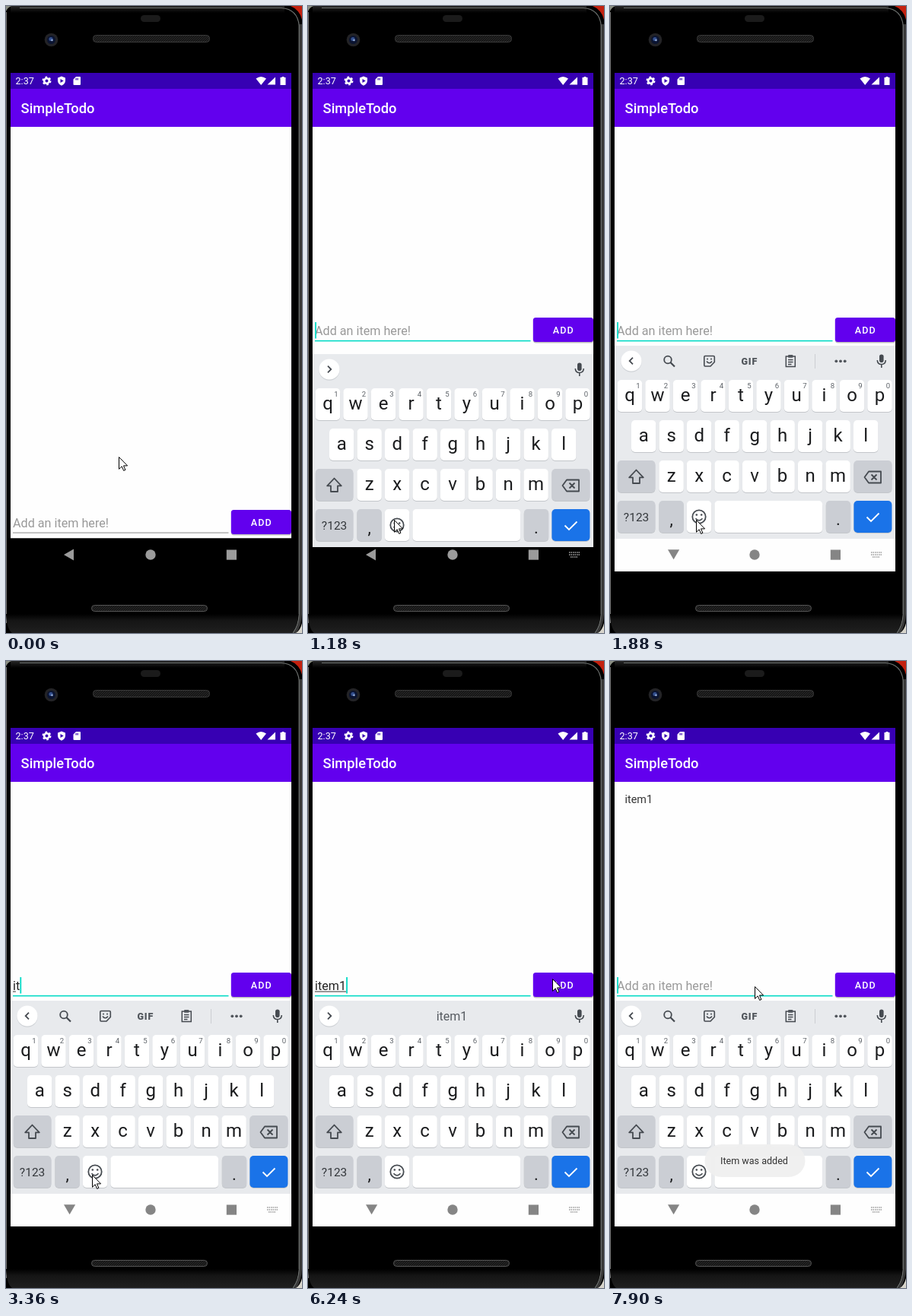
Animation of 389 by 825 pixels, one loop 8000 ms. Source, as an HTML page:

```html
<!DOCTYPE html>
<html lang="en">
<head>
<meta charset="utf-8">
<title>Todo app</title>
<style>
  html, body { margin: 0; width: 100%; height: 100%; overflow: hidden; background: #000; }
  svg { display: block; width: 389px; height: 825px; font-family: Roboto, sans-serif; }
  .mid { text-anchor: middle; }
  .line { fill: none; stroke: #454a50; }
  .field { font-size: 16.16px; }
</style>
</head>
<body>
<svg viewBox="0 0 389 825">
  <defs>
    <linearGradient id="top" x2="0" y2="1"><stop stop-color="#262626"/><stop offset="1" stop-color="#000"/></linearGradient>
    <linearGradient id="base" x2="0" y2="1"><stop stop-color="#000"/><stop offset=".35" stop-color="#151515"/><stop offset="1" stop-color="#1f1f1f"/></linearGradient>
    <pattern id="mesh" width="3" height="3" patternUnits="userSpaceOnUse"><rect width="3" height="3" fill="#151515"/><path d="M0 3L3 0" stroke="#2c2c2c"/></pattern>
    <clipPath id="below"><rect x="6" y="159" width="369" height="585"/></clipPath>
    <clipPath id="btnClip"><rect x="296" y="663" width="79" height="32" rx="3.5"/></clipPath>
  </defs>

  <!-- phone body -->
  <rect width="389" height="825" fill="#000"/>
  <path d="M374 0H389V18Q386 5 374 0Z" fill="#c3210f"/>
  <rect x="6" width="360" height="9" fill="url(#top)"/>
  <path d="M386.800 24V800Q386 816 379 825" fill="none" stroke="#383838" stroke-width="4.400"/>
  <path d="M18 2.500H362Q383 4 385.300 26V800Q384.500 815 377 825" fill="none" stroke="#6d716f" stroke-width="1.200"/>
  <path d="M.5 8V812" stroke="#777"/>
  <path d="M0 800H384.500Q384 815 376 825H8Q1 820 0 800Z" fill="url(#base)"/>
  <path d="M389 812V825H381Q387 821 389 812Z" fill="#d8d5cc"/>
  <path d="M0 0H7Q2 2 0 7Z" fill="#8b8f84"/>
  <rect x="177" y="12" width="26" height="9" rx="4.500" fill="#1b1b1b"/>
  <rect x="114.500" y="38.500" width="153" height="9" rx="4" fill="url(#mesh)" stroke="#3a3a3a"/>
  <rect x="112.500" y="788.500" width="152" height="8" rx="4" fill="url(#mesh)" stroke="#555"/>
  <circle cx="59.500" cy="44.500" r="8.800" fill="#232326"/>
  <circle cx="59.500" cy="44.500" r="5.500" fill="#0b1430"/>
  <circle cx="59" cy="43.500" r="2.600" fill="#34508e"/>
  <circle cx="60.500" cy="45" r="1.200" fill="#9db4dc"/>

  <!-- app -->
  <rect x="6" y="88" width="369" height="612.500" fill="#fefefe"/>
  <rect x="6" y="88" width="369" height="21" fill="#3700b3"/>
  <rect x="6" y="109" width="369" height="50" fill="#6200ee"/>
  <g fill="#fff">
    <text x="12.500" y="103.300" font-size="12.600">2:37</text>
    <circle cx="53.500" cy="98.500" r="3.300" fill="none" stroke="#fff" stroke-width="2.600"/>
    <circle cx="53.500" cy="98.500" r="5" fill="none" stroke="#fff" stroke-width="2" stroke-dasharray="2.62"/>
    <path d="M73 92.500L78 94.500V98Q78 102.500 73 104.700Q68 102.500 68 98V94.500ZM71.500 96V101L75.700 98.500Z" fill-rule="evenodd"/>
    <path d="M92 93H97Q98 93 98 94V103Q98 104 97 104H89.500Q88.500 104 88.500 103V96.500ZM91.500 95V97.500H92.700V95ZM93.600 95V97.500H94.800V95Z" fill-rule="evenodd"/>
    <path d="M328.500 95.500Q335 90.500 342 95.500L335.200 104Z"/>
    <path d="M354 93.500V103.500H343.500Z"/>
    <path d="M362.500 93H365.500V94H367.500V104H360.500V94H362.500Z"/>
    <text x="19.600" y="141" font-size="18.300" font-weight="500">SimpleTodo</text>
  </g>
  <text id="todo" x="19.500" y="186.500" font-size="14.400" fill="#333">item1</text>

  <g id="bar">
    <rect x="296" y="664.500" width="79" height="32" rx="3.500" fill="#000" opacity=".25"/>
    <rect x="295.800" y="663" width="79.200" height="32" rx="3.500" fill="#6200ee"/>
    <circle id="ripple" cx="323" cy="674" fill="#fff" opacity=".24" clip-path="url(#btnClip)"/>
    <text x="321.800" y="684" font-size="12.570" font-weight="500" letter-spacing="1.120" fill="#fff">ADD</text>
    <text id="hint" class="field" x="9" y="686" fill="#999">Add an item here!</text>
    <text id="typed" class="field" x="9" y="686" fill="#222"></text>
    <rect id="mark" x="9" y="687.500" height="1" fill="#333"/>
    <rect id="rule" x="9" width="283.500"/>
    <rect id="caret" y="669" width="1.800" height="21.500" fill="#03dac5"/>
  </g>

  <!-- navigation and keyboard -->
  <rect id="nav" x="6" y="700.500" width="369" height="43.500"/>
  <g clip-path="url(#below)"><g id="board" stroke-width="1.800">
    <rect x="6" y="447" width="369" height="254" fill="#e8eaed"/>
    <circle cx="28" cy="468" r="13.700" fill="#cfd2d6"/>
    <circle cx="28" cy="467" r="13.600" fill="#fff"/>
    <path id="chev" class="line"/>
    <rect x="354" y="458.500" width="5.600" height="10.500" rx="2.800" fill="#454a50"/>
    <path class="line" d="M351.300 466Q351.500 471.500 356.800 471.500Q362 471.500 362.300 466M356.800 471.500V476" stroke-width="1.600"/>
    <g id="tools" fill="#50555b">
      <circle class="line" cx="76" cy="465.500" r="4.800"/>
      <path class="line" d="M79.500 469L85 474.500" stroke-width="2.200"/>
      <path class="line" d="M125 460.500H136Q137.300 460.500 137.300 462V468.500L132 474H125Q123.800 474 123.800 472.500V462Q123.800 460.500 125 460.500ZM127 467.500Q130.500 472 134 467.500" stroke-width="1.600"/>
      <circle cx="128" cy="464.500" r="1.100"/><circle cx="133" cy="464.500" r="1.100"/>
      <text class="mid" x="183.300" y="471.500" font-size="12.500" font-weight="900" letter-spacing=".8">GIF</text>
      <path class="line" d="M231.300 461H243.300V474.500H231.300ZM234 465.500H240.500M234 468.500H240.500M234 471.500H238.500" stroke-width="1.500"/>
      <rect x="234" y="459" width="6.500" height="3.700" rx="1"/>
      <path d="M269.500 458V477" stroke="#cbced2" stroke-width="1"/>
      <circle cx="297.300" cy="467.300" r="1.900"/><circle cx="303" cy="467.300" r="1.900"/><circle cx="308.700" cy="467.300" r="1.900"/>
    </g>
    <g id="words" class="mid" font-size="16" fill="#555a60">
      <path id="bars" d="M135.500 457V478M243.500 457V478" stroke="#c4c7cb" stroke-width="1"/>
      <text x="87.500" y="473"></text><text x="189" y="473"></text><text x="291" y="473"></text>
    </g>
    <g id="keys"></g>
    <path class="line" d="M34.500 610.500L25.200 620.300H30V628H39V620.300H43.800Z" stroke-linejoin="round"/>
    <path class="line" d="M340 612.500H356V627.500H340L334.500 620ZM343.500 616.500L350.500 623.500M350.500 616.500L343.500 623.500" stroke-linejoin="round"/>
    <circle class="line" cx="117" cy="672" r="8.700"/>
    <circle cx="113.800" cy="669.500" r="1.300" fill="#454a50"/><circle cx="120.200" cy="669.500" r="1.300" fill="#454a50"/>
    <path class="line" d="M112.500 674.200Q117 679.500 121.500 674.200" stroke-width="1.600"/>
    <path d="M337.500 672.500L343 678L353.500 667.500" fill="none" stroke="#fff"/>
  </g></g>
  <g id="icons">
    <path id="back"/>
    <circle cx="190" cy="722" r="6.700"/>
    <rect x="289.800" y="715.500" width="13.200" height="13.200"/>
    <path id="dots" d="M343 719H357M343 722H357M345 725H355" stroke-width="1.500" stroke-dasharray="1.5 1"/>
  </g>

  <g id="toast">
    <rect x="124.500" y="636" width="132" height="43" rx="21.500" fill="#f0f0f0" opacity=".96"/>
    <text x="145" y="662" font-size="12.570" fill="#333">Item was added</text>
  </g>
  <path id="mouse" d="M.5 .5V16.300L4.200 12.800L6.700 18.400L8.900 17.400L6.500 11.900H11.600Z" fill="#fff" stroke="#000"/>
</svg>
<script>
const $ = id => document.getElementById(id);
const LOOP = 8000;

function add(name, attrs, text = '') {
  const el = document.createElementNS('http://www.w3.org/2000/svg', name);
  for (const k in attrs) el.setAttribute(k, attrs[k]);
  el.textContent = text;
  $('keys').append(el);
}

function key(x, y, w, label = '', fill = '#fff', size = 24, base = 27.5, ink = '#1b1c1e') {
  add('rect', { x, y: y + 1, width: w, height: 42, rx: 5, fill: '#c3c6ca' });
  add('rect', { x, y, width: w, height: 42, rx: 5, fill });
  if (label) add('text', { class: 'mid', x: x + w / 2, y: y + base, 'font-size': size, fill: ink }, label);
}

const GREY = '#cbced4', PITCH = 36.5, W = 32.4;
[['qwertyuiop', 9.8, 492], ['asdfghjkl', 28, 545], ['zxcvbnm', 64.4, 598]].forEach(([row, x0, y]) =>
  [...row].forEach((c, i) => key(x0 + i * PITCH, y, W, c)));
[...'1234567890'].forEach((d, i) =>
  add('text', { class: 'mid', x: 37 + i * PITCH, y: 503, 'font-size': 9.6, fill: '#5c6167' }, d));
key(9.8, 598, 49.6, '', GREY);
key(320.4, 598, 50, '', GREY);
key(9.8, 651, 49.6, '?123', GREY, 15.5, 27, '#33373b');
key(64.4, 651, W, ',', GREY, 22, 32);
key(100.9, 651, W);
key(137.4, 651, 141.8);
key(283.8, 651, W, '.', GREY, 22, 32);
key(320.4, 651, 50, '', '#1a73e8');

// Each track is a list of [start ms, value...]
const tracks = {
  mouse: [[0, 148, 593], [120, 138, 660], [270, 113, 673], [420, 113, 676], [5340, 116, 668],
    [5460, 128, 636], [5580, 156, 590], [5700, 197, 540], [5820, 233, 493], [5970, 290, 444],
    [6090, 320, 420], [6240, 321, 418], [7270, 290, 419], [7390, 228, 422], [7510, 190, 424], [7660, 190, 428]],
  caret: [[0, 0], [540, 1], [1420, 0], [1880, 1], [2250, 0], [2680, 1], [4100, 0], [4380, 1],
    [5460, 0], [5970, 1], [6490, 0], [6730, 1], [7270, 0], [7780, 1]],
  typed: [[0, ''], [3080, 'i'], [3360, 'it'], [4380, 'ite'], [4660, 'item'], [4780, 'item1'], [6730, '']],
  marked: [[0, 0], [3360, 1], [3510, 2], [4660, 3], [4780, 4], [5060, 5], [6730, 0]],
  words: [[0, '', '', ''], [3510, "it's", 'it', 'its'], [4660, 'ite', 'item1', 'item2'], [5060, '', 'item1', ''], [7000, '', '', '']],
  tools: [[0, 0], [1880, 1], [3510, 0], [7000, 1]],
  board: [[0, 300, 0], [940, 225, .12], [1060, 126, .5], [1180, 11, 1], [1300, 1, 1], [1420, 0, 1]],
  ripple: [[0, 0], [6490, 24], [6610, 60], [7000, 0]],
  toast: [[0, 0], [7000, .5], [7270, .85], [7510, 1]]
};
const ends = [0, 3.9, 9.2, 17.8, 31.9, 41];

function at(name, t) {
  const track = tracks[name];
  let i = track.length - 1;
  while (track[i][0] > t) i--;
  return track[i].slice(1);
}

const set = (id, attrs) => { for (const k in attrs) $(id).setAttribute(k, attrs[k]); };
const labels = $('words').querySelectorAll('text');

function draw(t) {
  const [text] = at('typed', t), [marked] = at('marked', t), words = at('words', t);
  const [tools] = at('tools', t), [dy, alpha] = at('board', t);
  const focus = t >= 540, raised = t >= 940, light = t >= 1880;

  set('mouse', { transform: `translate(${at('mouse', t)})` });
  set('bar', { transform: `translate(0 ${raised ? -253 : 0})` });
  set('rule', focus ? { y: 692.8, height: 1.6, fill: '#03dac5' } : { y: 692.6, height: 1, fill: '#8a8a8a' });
  set('caret', { x: 9.2 + ends[text.length], opacity: at('caret', t)[0] });
  set('hint', { opacity: text ? 0 : 1 });
  $('typed').textContent = text;
  set('mark', { width: ends[marked] });
  set('ripple', { r: at('ripple', t)[0] });
  set('todo', { opacity: t >= 7000 ? 1 : 0 });

  set('board', { transform: `translate(0 ${dy})`, opacity: alpha });
  set('tools', { opacity: tools });
  set('chev', { d: tools ? 'M30 462.700L25.700 467L30 471.300' : 'M26 462.700L30.300 467L26 471.300' });
  set('bars', { opacity: words[0] ? 1 : 0 });
  labels.forEach((el, i) => el.textContent = words[i]);

  set('nav', { fill: light ? '#fefefe' : '#000' });
  set('icons', { fill: light ? '#858585' : '#9b9b9b' });
  set('back', { d: t >= 1570 ? 'M76 715.300H91.200L83.600 728.300Z' : 'M76 722L89 714.500V729.500Z' });
  set('dots', { stroke: light ? '#999' : '#aaa', opacity: raised ? 1 : 0 });
  set('toast', { opacity: at('toast', t)[0] });
}

const start = performance.now();
function tick() {
  draw((performance.now() - start) % LOOP);
  requestAnimationFrame(tick);
}
tick();
</script>
</body>
</html>
```
